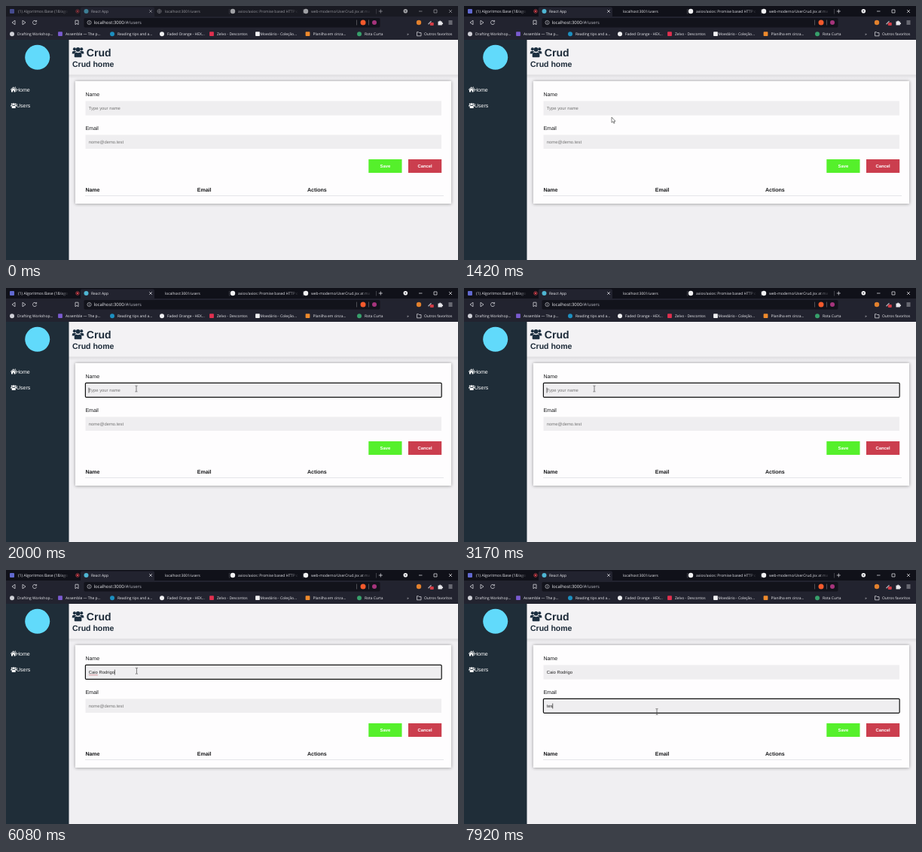
Write an HTML page that moves like this. It is 600 by 338 pixels and loops after 8000 ms.

```html
<!DOCTYPE html>
<html lang="pt-BR">
<head>
<meta charset="utf-8">
<title>Crud</title>
<style>
html, body { margin: 0; width: 100%; height: 100%; overflow: hidden; background: #f0eff2; }
svg { display: block; width: 600px; height: 338px; }
text { white-space: pre; font-family: "Liberation Sans", Arial, sans-serif; text-rendering: geometricPrecision; }
.ui { font-family: "Open Sans", "Noto Sans", sans-serif; font-size: 4.95px; fill: #eeeef2; }
.label { font-size: 7.03px; fill: #17181a; }
.field { font-size: 5.86px; fill: #222; }
.hint { font-size: 5.86px; fill: #757575; }
.btn { font-size: 5.86px; font-weight: 700; fill: #fff; }
.bold { font-weight: 700; }
.line { fill: none; stroke: #dcdce2; stroke-width: .75; }
</style>
</head>
<body>
<svg viewBox="0 0 600 338" xmlns="http://www.w3.org/2000/svg">
  <defs>
    <linearGradient id="fade">
      <stop offset=".84" stop-color="#e6e6ec"/>
      <stop offset="1" stop-color="#e6e6ec" stop-opacity=".1"/>
    </linearGradient>
    <linearGradient id="under" x2="0" y2="1">
      <stop stop-color="#000" stop-opacity=".08"/>
      <stop offset="1" stop-color="#000" stop-opacity="0"/>
    </linearGradient>
    <filter id="soft" x="-5%" y="-10%" width="110%" height="120%"><feGaussianBlur stdDeviation="2.2"/></filter>
    <g id="users">
      <circle cx="3.2" cy="4.2" r="2.1"/><circle cx="12.8" cy="4.2" r="2.1"/>
      <path d="M0 10.4V9Q0 6.8 2 6.8H4.4Q5.2 6.8 5.6 7.4Q3.9 8.4 3.6 10.4ZM16 10.4V9Q16 6.8 14 6.8H11.6Q10.8 6.8 10.4 7.4Q12.1 8.4 12.4 10.4Z"/>
      <circle cx="8" cy="4.8" r="2.9"/>
      <path d="M3 14V12.3Q3 8.6 6 8.6Q8 9.6 10 8.6Q13 8.6 13 12.3V14Q13 15 12 15H4Q3 15 3 14Z"/>
    </g>
  </defs>

  <!-- browser -->
  <rect id="strip" width="600" height="15"/>
  <path d="M99 15V3.5Q99 1.5 101 1.5H195Q197 1.5 197 3.5V15Z" fill="#22232f"/>
  <rect y="14" width="600" height="31" fill="#22232f"/>
  <rect x="103.5" y="16" width="393" height="12.4" rx="1.6" fill="#12131b"/>
  <g id="tabs">
    <rect x="5" y="4" width="6" height="6" rx="1" fill="#6169d0"/>
    <circle cx="95" cy="7" r="2.3" fill="none" stroke="#d9434c" stroke-width=".7"/>
    <circle cx="95" cy="7" r="1.2" fill="#d9434c"/>
    <circle cx="106.5" cy="7" r="3" fill="#4fb6d3"/>
    <circle cx="301" cy="7" r="3.2" fill="#f2f2f4"/>
    <circle cx="398" cy="7" r="3.2" fill="#f2f2f4"/>
    <path class="line" d="M296.5 4V10.5M394.5 4V10.5M491.5 4V10.5" opacity=".3"/>
    <path class="line" d="M190.2 5.2l3.6 3.6m0-3.6l-3.6 3.6M494.8 7h5M497.3 4.5v5M548 7h4.5M568 5h4v4h-4zM588 5l4 4m0-4l-4 4"/>
    <circle cx="530.3" cy="6.8" r="2.8" fill="#f2f2f4"/>
    <path d="M529 6.2h2.6l-1.3 1.6z" fill="#181922"/>
  </g>
  <g id="globe" class="line" opacity=".45"><circle cx="203.5" cy="7" r="2.6"/><path d="M201 7h5M203.5 4.4v5.2"/></g>

  <path class="line" d="M12 19.2V24.8L8 22ZM22 19.2V24.8L26 22ZM40 20.2A2.6 2.6 0 1 0 40.6 22.6M40.6 18.9V20.8H38.6M92 19.2H96V24.8L94 23.2L92 24.8Z"/>
  <g class="line" style="stroke-width:.6"><circle cx="110.5" cy="22" r="2.6"/><path d="M110.5 21.5v2M110.5 20.3v.6"/></g>
  <path class="line" d="M465.5 18.5V25.5M481.5 18.5V25.5" opacity=".4"/>
  <circle cx="474" cy="22" r="3.5" fill="#f45a2c"/>
  <circle cx="489" cy="22" r="3" fill="#a5347c"/>
  <circle cx="548" cy="22" r="3.2" fill="#e2812d"/>
  <path d="M560 23.8l4-4 1 1-4 4z" fill="#a7a8b0"/>
  <rect x="562.8" y="22" width="5" height="4" rx="1" fill="#d33c46"/>
  <path d="M573.5 20.5h1.7a1 1 0 1 1 2 0h1.6v1.8a1 1 0 1 1 0 1.9v1.4h-5.3z" fill="#e8e8ec"/>
  <path class="line" d="M587.5 20h5M587.5 22h5M587.5 24h5"/>
  <path class="line" d="M545.5 34.7h2l.8.9h2.7v4.2h-5.5z"/>
  <text class="ui" x="532.2" y="38.8">»</text>
  <g id="chrome"></g>

  <!-- page -->
  <rect x="83" y="45" width="517" height="293" fill="#f0eff2"/>
  <rect x="83" y="45" width="517" height="46.5" fill="#f3f2f4"/>
  <rect x="83" y="91.5" width="517" height="5" fill="url(#under)"/>
  <rect y="45" width="83.5" height="293" fill="#1f2d38"/>
  <circle cx="41.7" cy="68.3" r="16.5" fill="#61dafb"/>
  <path d="M5.8 111.2L9.8 107.4L13.7 111.2L13.1 111.8L9.8 108.6L6.4 111.8ZM7 111.8L9.8 109.2L12.5 111.8V114.5H10.6V112.4H9V114.5H7ZM11.8 107.6h.9v2l-.9-.8z" fill="#fff"/>
  <use href="#users" transform="translate(6.2 128.4) scale(.5)" fill="#fff"/>
  <use href="#users" transform="translate(87.8 53) scale(.97 1.02)" fill="#1c2f40"/>
  <rect x="92" y="100" width="499" height="163.5" fill="#000" opacity=".36" filter="url(#soft)"/>
  <rect x="92" y="100" width="499" height="163" fill="#fefdfe"/>
  <rect x="105.5" y="126.5" width="472.5" height="19" fill="#efeef0"/>
  <rect x="105.5" y="171.5" width="472.5" height="18.5" fill="#efeef0"/>
  <rect x="481.3" y="204" width="44.2" height="18" fill="#55f02b"/>
  <rect x="534" y="204" width="44.2" height="18" fill="#cb3e4e"/>
  <rect x="105" y="252.2" width="476" height=".8" fill="#dfe0e4"/>
  <g id="page"></g>

  <!-- live parts -->
  <rect id="ring" x="105.4" width="472.8" height="19" rx="1.2" fill="none" stroke="#111" stroke-width="1.2"/>
  <text id="name" class="field" x="109.8" y="138.1"></text>
  <text id="mail" class="field" x="109.8" y="183.1"></text>
  <path id="wave" fill="none" stroke="#b8323a" stroke-width=".55"/>
  <rect id="caret" width=".6" height="7" fill="#000"/>
  <path id="arrow" d="M0 0V7.2L1.7 5.7L2.9 8.2L4 7.7L2.9 5.3H5Z" fill="#fff" stroke="#333" stroke-width=".6"/>
  <path id="beam" d="M-1.5-3.9H-.4L0-3.5L.4-3.9H1.5M0-3.5V3.5M-1.5 3.9H-.4L0 3.5L.4 3.9H1.5" fill="none" stroke="#3a3a3a" stroke-width=".65"/>
</svg>
<script>
const LOOP = 8000;
const WAKE = 830, FOCUS_NAME = 1890, FOCUS_MAIL = 6640;
const NS = "http://www.w3.org/2000/svg";
const $ = id => document.getElementById(id);
const show = (el, on) => el.setAttribute("visibility", on ? "visible" : "hidden");

function make(tag, parent, attrs, text = "") {
  const el = document.createElementNS(NS, tag);
  for (const k in attrs) el.setAttribute(k, attrs[k]);
  el.textContent = text;
  return parent.appendChild(el);
}
const label = (parent, cls, x, y, text, style = "") =>
  make("text", parent, { class: cls, x, y, style }, text);

const tabs = $("tabs"), chrome = $("chrome"), page = $("page");

const faded = "fill:url(#fade)";
label(tabs, "ui", 16, 8.8, "(1) Algoritmos Base (18/ago", faded + ";font-size:5.2px");
label(tabs, "ui", 113, 8.8, "React App");
label(tabs, "ui", 211, 8.8, "localhost:3001/users", "font-size:4.87px");
label(tabs, "ui", 308, 8.8, "axios/axios: Promise based HTTP c", faded);
label(tabs, "ui", 405, 8.8, "web-moderno/UserCrud.jsx at ma", faded);

const url = label(chrome, "ui", 116.5, 24.1, "localhost:3000", "font-size:5.95px");
make("tspan", url, { fill: "#b4b5bf" }, "/#/users");

// x, text, icon colour, icon is square
[
  [15, "Drafting Workshop...", "#cfcfd6", 0],
  [79, "Assemble — The p...", "#7a5bd0", 1],
  [148, "Reading tips and a...", "#1c8fc0", 0],
  [214, "Faded Orange - HEX...", "#f0f0f2", 0],
  [280, "Zelvo - Descontos", "#e0304f", 1],
  [337.5, "Moedário - Coleção...", "#f0f0f2", 1],
  [407.5, "Planilha em cinza...", "#ee8a2c", 1],
  [476, "Rota Curta", "#37a06b", 0]
].forEach(([x, text, fill, square]) => {
  const cx = x === 337.5 ? 334 : x - 7;
  if (square) make("rect", chrome, { x: cx - 2.9, y: 34.3, width: 5.8, height: 5.8, rx: .8, fill });
  else make("circle", chrome, { cx, cy: 37.2, r: 3, fill });
  label(chrome, "ui", x, 38.9, text);
});
label(chrome, "ui", 555, 38.9, "Outros favoritos");

label(page, "label", 13, 113.6, "Home", "fill:#fff");
label(page, "label", 14, 135.4, "Users", "fill:#fff");
label(page, "bold", 106.8, 66.6, "Crud", "font-size:14.06px;fill:#1c2a38");
label(page, "bold", 88, 80.6, "Crud home", "font-size:10.5px;fill:#1c2a38");
label(page, "label", 105.4, 120.4, "Name");
label(page, "label", 105.4, 165.3, "Email");
label(page, "btn", 496.6, 215.1, "Save");
label(page, "btn", 546.5, 215.1, "Cancel");
[[105.4, "Name"], [253.8, "Email"], [400, "Actions"]].forEach(([x, s]) =>
  label(page, "label bold", x, 246.7, s));
const hintName = label(page, "hint", 109.8, 138.1, "Type your name");
const hintMail = label(page, "hint", 109.8, 183.1, "nome@demo.test");

const nameKeys = { text: "Caio Rodrigo",
  at: [3580, 3920, 4000, 4170, 4330, 4500, 4670, 4920, 5080, 5250, 5500, 5670] };
const mailKeys = { text: "tes", at: [7580, 7830, 7920] };
const typed = (keys, t) => keys.text.slice(0, keys.at.filter(k => t >= k).length);

// pointer stops: time, x, y
const stops = [[920, 300, 238], [1420, 196, 148], [1670, 173, 134], [6060, 173, 134], [6560, 256, 188.6], [LOOP, 256, 188.6]];

function pointer(t) {
  const i = Math.max(1, stops.findIndex(s => t < s[0]));
  const [t0, x0, y0] = stops[i - 1], [t1, x1, y1] = stops[i];
  const k = Math.min(1, Math.max(0, (t - t0) / (t1 - t0)));
  const e = k * k * (3 - 2 * k);
  return [x0 + (x1 - x0) * e, y0 + (y1 - y0) * e];
}

let wave = "M109.8 139.7";
for (let i = 0; i < 6; i++) wave += "q.5-.7 1 0t1 0";
$("wave").setAttribute("d", wave);

function draw(t) {
  const awake = t >= WAKE;
  $("strip").setAttribute("fill", awake ? "#101119" : "#191a22");
  tabs.setAttribute("opacity", awake ? 1 : .62);
  show($("globe"), !awake);

  const name = typed(nameKeys, t), mail = typed(mailKeys, t);
  const inMail = t >= FOCUS_MAIL, focused = t >= FOCUS_NAME;
  $("name").textContent = name;
  $("mail").textContent = mail;
  show(hintName, !name);
  show(hintMail, !mail);
  show($("wave"), t >= nameKeys.at[4] && !inMail);
  show($("ring"), focused);
  $("ring").setAttribute("y", inMail ? 171.3 : 126.4);

  const keys = inMail ? mailKeys : nameKeys;
  const since = Math.max(inMail ? FOCUS_MAIL : FOCUS_NAME, ...keys.at.filter(k => t >= k));
  show($("caret"), focused && (t - since) % 1060 < 530);
  const box = $(inMail ? "mail" : "name");
  const width = box.textContent ? box.getComputedTextLength() : 0;
  $("caret").setAttribute("x", 109.7 + width);
  $("caret").setAttribute("y", inMail ? 177.5 : 132.6);

  const [x, y] = pointer(t);
  const overField = x > 105 && (y > 126 && y < 145.5 || y > 171.5 && y < 190);
  const here = t >= stops[0][0];
  show($("arrow"), here && !overField);
  show($("beam"), here && overField);
  for (const id of ["arrow", "beam"]) $(id).setAttribute("transform", `translate(${x} ${y})`);
}

const start = performance.now();
function tick() {
  draw((performance.now() - start) % LOOP);
  requestAnimationFrame(tick);
}
tick();
</script>
</body>
</html>
```
